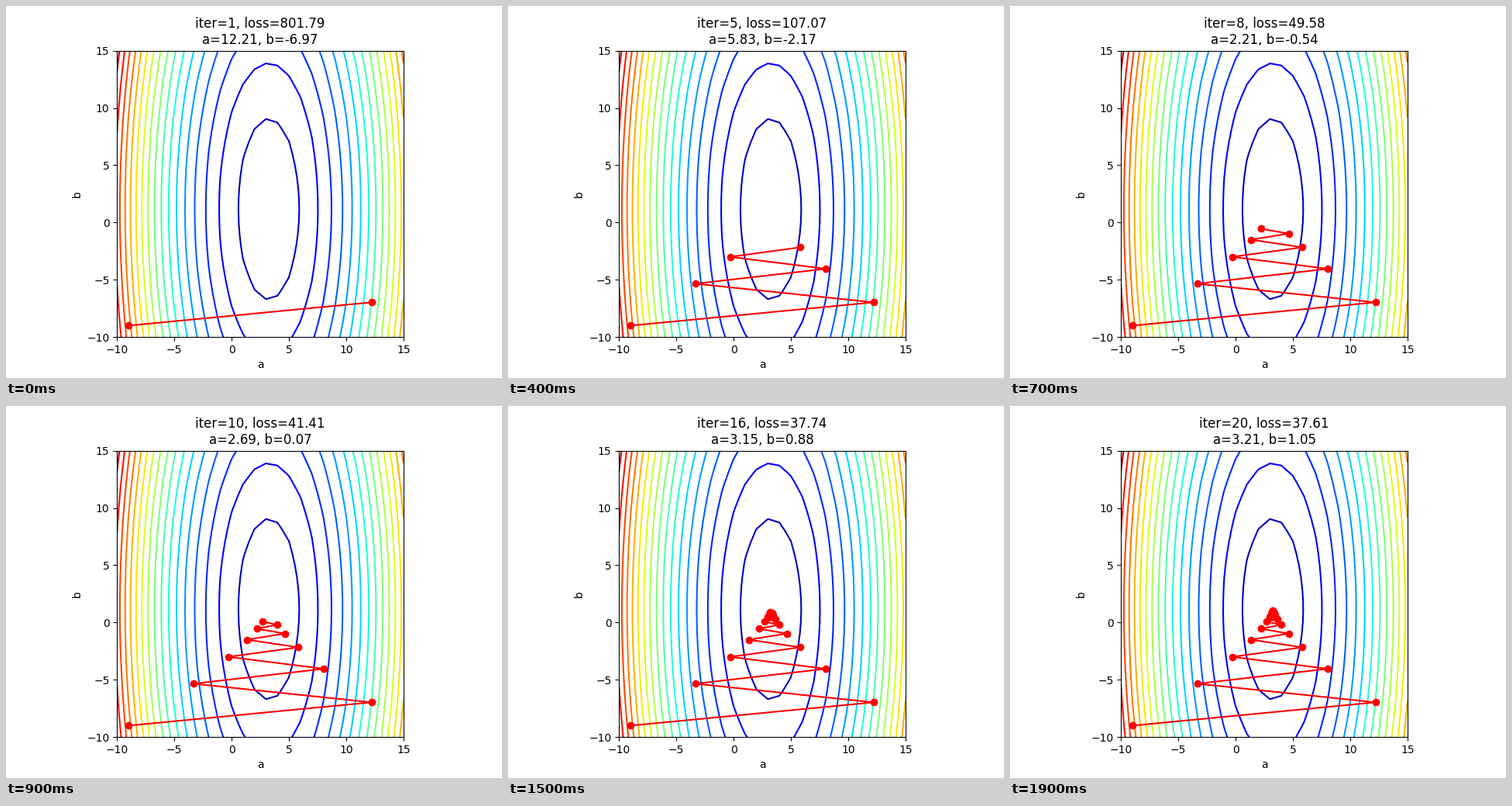
A matplotlib script for the animation above (2 s loop, 640 by 480 pixels).

```python
import numpy as np
import matplotlib.pyplot as plt
from matplotlib.animation import FuncAnimation

STEPS = 20
RATE = 0.1
A_MIN, B_MIN, LOSS_MIN = 3.2383, 1.1648, 37.5944
X2_MEAN = 26 / 3  # mean squared x of 51 samples on [-5, 5]


def loss(a, b):
    return X2_MEAN * (a - A_MIN) ** 2 + (b - B_MIN) ** 2 + LOSS_MIN


def descend(a, b):
    path = [(a, b)]
    for _ in range(STEPS):
        a -= RATE * 2 * X2_MEAN * (a - A_MIN)
        b -= RATE * 2 * (b - B_MIN)
        path.append((a, b))
    return np.array(path)


path = descend(-9.0, -9.0)

fig, ax = plt.subplots(figsize=(6.4, 4.8), dpi=100)
grid = np.arange(-10, 16)
aa, bb = np.meshgrid(grid, grid)
ax.contour(aa, bb, loss(aa, bb), levels=np.arange(0, 1801, 100), cmap="jet")
ax.set_aspect("equal")
ax.set(xlim=(-10, 15), ylim=(-10, 15), xlabel="a", ylabel="b")
trail, = ax.plot([], [], "ro-")
title = ax.set_title("")


def draw(i):
    n = i + 1
    a, b = path[n]
    trail.set_data(path[:n + 1, 0], path[:n + 1, 1])
    title.set_text(f"iter={n}, loss={loss(a, b):.2f}\na={a:.2f}, b={b:.2f}")
    return trail, title


anim = FuncAnimation(fig, draw, frames=STEPS, init_func=lambda: draw(0),
                     interval=100, repeat=True, repeat_delay=0)
plt.show()
```
